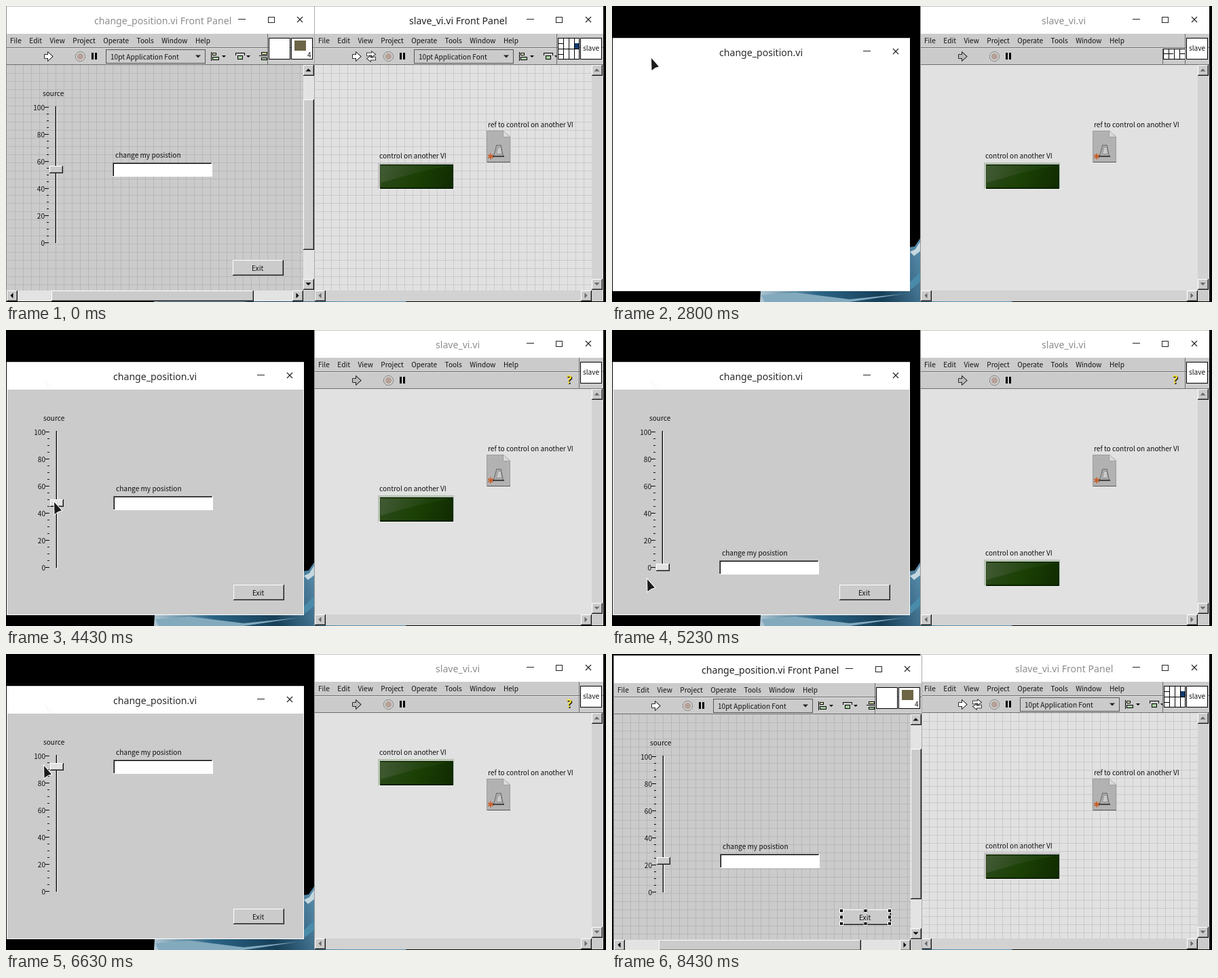
Write an HTML page with a canvas that moves like this. It is 884 by 437 pixels and loops after 9460 ms.

```html
<!DOCTYPE html>
<html lang="en">
<head>
<meta charset="utf-8">
<title>Front panels</title>
<style>
html, body { margin: 0; width: 100%; height: 100%; overflow: hidden; background: #000; }
canvas { display: block; }
</style>
</head>
<body>
<canvas id="stage" width="884" height="437"></canvas>
<script>
const g = document.getElementById('stage').getContext('2d');
const LOOP = 9460, STEP = 200;
const FACE = '#cbcbcb', LINE = '#6e6e6e', INK = '#101010';
const UI = '10.1px "Noto Sans CJK JP", "Noto Sans CJK SC", "Noto Sans", sans-serif';
const TITLE = '14.1px "Noto Sans", sans-serif';
const MENU = ['File', 'Edit', 'View', 'Project', 'Operate', 'Tools', 'Window', 'Help'];

// Phases in ms
const ENTER = 1410, FOCUS = 2200, RUN = 2610, READY = 3010,
  GRAB = 4230, RELEASE = 7230, PRESS = 8030, STOP = 8230, SELECT = 8430;

// Pointer moves: start, end, then where it arrives
const MOVES = [
  [1210, 2400, 57, 76],
  [2810, 3630, 88, 246],
  [3630, 4030, 72, 240],
  [GRAB, 5230, 51, 367],
  [5330, 6230, 55, 109],
  [6230, 6630, 55, 164],
  [6630, RELEASE, 52, 302],
  [RELEASE, 7830, 386, 389]
];

const clamp = (v, lo, hi) => Math.max(lo, Math.min(hi, v));

function ease(p) {
  p = clamp(p, 0, 1);
  return p * p * (3 - 2 * p);
}

function pointerAt(t) {
  let x = 94, y = 118;
  for (const [from, to, nx, ny] of MOVES) {
    const e = ease((t - from) / (to - from));
    x += (nx - x) * e;
    y += (ny - y) * e;
  }
  return [Math.round(x), Math.round(y)];
}

function rect(c, x, y, w, h) { g.fillStyle = c; g.fillRect(x, y, w, h); }

function frame(c, x, y, w, h, fill) {
  if (fill) rect(fill, x, y, w, h);
  g.strokeStyle = c; g.lineWidth = 1;
  g.strokeRect(x + .5, y + .5, w - 1, h - 1);
}

function text(s, x, y, c = INK, font = UI, align = 'left') {
  g.font = font; g.fillStyle = c; g.textAlign = align;
  g.fillText(s, x, y);
}

function path(pts, fill, stroke, width = 1) {
  g.beginPath();
  pts.forEach(([x, y]) => g.lineTo(x, y));
  g.closePath();
  if (stroke) { g.strokeStyle = stroke; g.lineWidth = width; g.stroke(); }
  if (fill) { g.fillStyle = fill; g.fill(); }
}

function shade(x0, y0, x1, y1, ...colours) {
  const fill = g.createLinearGradient(x0, y0, x1, y1);
  colours.forEach((c, i) => fill.addColorStop(i / (colours.length - 1), c));
  return fill;
}

function raised(x, y, w, h, face = FACE) {
  rect('#111', x, y, w, h);
  rect('#fff', x, y, w - 1, h - 1);
  rect('#858585', x + 1, y + 1, w - 2, h - 2);
  rect(face, x + 1, y + 1, w - 3, h - 3);
}

function at(x, y, fn) { g.save(); g.translate(x, y); fn(); g.restore(); }

function windowButtons(y, min, max, close) {
  rect('#222', min, y - 1, 11, 1);
  if (max) frame('#222', max, y - 4, 10, 9);
  g.strokeStyle = '#222'; g.lineWidth = 1.1;
  g.beginPath();
  g.moveTo(close - 4, y - 4); g.lineTo(close + 4, y + 4);
  g.moveTo(close + 4, y - 4); g.lineTo(close - 4, y + 4);
  g.stroke();
}

function triangle(x, y, turn, c, r = 4) {
  at(x, y, () => {
    g.rotate(turn * Math.PI / 2);
    path([[-r, r / 2], [r, r / 2], [0, -r / 2]], c);
  });
}

function scrollbars(right, live) {
  const c = live ? '#000' : '#666', track = live ? '#e3e3e3' : '#d2d2d2', low = 420;
  const arrow = (x, y, turn) => {
    raised(x, y, 16, 16);
    triangle(x + 7.5, y + 7.5, turn, c);
  };
  rect(track, right, 87, 16, low - 87);
  rect(track, 1, low, right - 1, 16);
  rect(FACE, right, low, 16, 16);
  arrow(right, 87, 0);
  arrow(right, low - 17, 2);
  arrow(1, low, 3);
  arrow(right - 16, low, 1);
  if (live) {
    raised(right, 138, 16, 222);
    raised(67, low, 298, 16);
  }
}

function alignIcon(x) {
  rect('#000', x, 68, 1, 13);
  frame('#000', x + 2, 69, 6, 4, '#e6e6b4');
  frame('#000', x + 2, 75, 10, 5, '#a9cfa4');
  triangle(x + 19, 74.5, 2, '#000', 3);
}

function spreadIcon(x) {
  rect('#000', x, 69, 14, 1);
  rect('#000', x, 69, 1, 4);
  rect('#000', x + 13, 69, 1, 4);
  frame('#000', x + 3, 73, 8, 6, '#a9cfa4');
  triangle(x + 19, 74.5, 2, '#000', 3);
}

function repeatIcon() {
  for (const turn of [0, Math.PI]) at(84, 74.5, () => {
    g.rotate(turn);
    path([[-6, -1], [-6, -5], [1, -5], [1, -7], [6, -3], [1, 0], [1, -2], [-3, -2], [-3, -1]], '#fff', '#000', 1.4);
  });
}

function toolbar(width, running, repeat) {
  rect(FACE, 0, 41, width, 46);
  let x = 6;
  for (const item of MENU) {
    text(item, x, 55);
    x += g.measureText(item).width + 11.5;
  }
  rect(LINE, 0, 61, width, 1);
  rect('#e4e4e4', 0, 62, width, 1);
  rect(LINE, 0, 86, width, 1);
  path([[57, 72], [62, 72], [62, 68.5], [68.5, 74.5], [62, 80.5], [62, 77], [57, 77]],
    running ? '#bbb' : '#fff', '#000', 1.6);
  g.beginPath(); g.arc(109.5, 74.5, 7, 0, 7);
  g.fillStyle = '#ddd'; g.fill();
  g.strokeStyle = '#777'; g.lineWidth = 1; g.stroke();
  g.beginPath(); g.arc(109.5, 74.5, 5, 0, 7);
  g.fillStyle = '#b5a198'; g.fill();
  rect('#000', 126, 69, 3, 10);
  rect('#000', 131, 69, 3, 10);
  if (running) return;
  if (repeat) repeatIcon();
  frame('#555', 147, 64, 147, 21);
  text('10pt Application Font', 154, 79);
  triangle(283, 74.5, 2, '#222', 4);
  alignIcon(302);
  spreadIcon(338);
}

function grid(right, c) {
  for (let x = 13; x < right; x += 12) rect(c, x, 87, 1, 333);
  for (let y = 99; y < 420; y += 12) rect(c, 1, y, right - 1, 1);
}

function iconBox(x) { frame('#000', x, 47, 32, 32, '#fff'); }

function connector(x) {
  iconBox(x);
  for (const d of [8, 16, 24]) rect('#000', x + d, 47, 1, 32);
  rect('#000', x, 63, 32, 1);
  rect('#000', x, 55, 8, 1);
  rect('#000', x, 71, 8, 1);
  rect('#123b70', x + 25, 55, 6, 8);
}

function controls(h, { active = false, pressed = false, selected = false }) {
  text('source', 54, 133);
  for (let i = 0; i <= 20; i++) {
    const y = 149 + i * 10, major = i % 4 === 0;
    rect('#000', major ? 57 : 60, y, major ? 6 : 3, 1);
    if (major) text(100 - i * 5, 57, y + 5, INK, UI, 'right');
  }
  rect('#888', 72, 148, 1, 202);
  rect('#000', 73, 148, 1, 202);
  rect('#fff', 74, 149, 1, 202);
  raised(64, h - 5, 20, 11, active ? '#e2e2e2' : FACE);

  text('change my posistion', 161, h - 17);
  rect('#fff', 157, h - 10, 147, 21);
  rect('#777', 157, h - 10, 146, 20);
  rect('#000', 158, h - 9, 144, 19);
  rect('#fff', 159, h - 8, 144, 18);

  if (pressed) frame('#666', 334, 375, 75, 23, FACE);
  else raised(334, 375, 75, 23);
  text('Exit', 362 + pressed, 391 + pressed);
  if (selected) {
    for (let i = 0; i < 9; i++) {
      if (i === 4) continue;
      frame('#fff', 333 + i % 3 * 35.5, 374 + Math.floor(i / 3) * 9.5, 6, 6, '#000');
    }
  }
}

function titleBar(s, x, w, focused) {
  rect('#fff', 0, 0, w, 41);
  rect('#c8c8c8', 0, 0, w, 1);
  text(s, x, 27, focused ? '#222' : '#8e8e8e', TITLE);
}

function editWindow(h, focused, opts) {
  titleBar('change_position.vi Front Panel', 130, 455, focused);
  windowButtons(20, 342, 386, 433);
  rect(FACE, 0, 41, 455, 395);
  toolbar(454, false, false);
  rect('#000', 373, 73, 12, 1);
  frame('#000', 376, 68, 9, 4, '#e6e6b4');
  frame('#000', 376, 76, 9, 4, '#a9cfa4');
  rect(LINE, 385, 41, 1, 45);
  iconBox(387);
  iconBox(420);
  rect('#6d6546', 425, 51, 17, 15);
  text('4', 444, 76);
  grid(438, '#b8b8b8');
  controls(h, opts);
  scrollbars(438, true);
  rect('#888', 0, 0, 1, 436);
  rect('#aaa', 454, 0, 1, 436);
}

function runWindow(h, blank, opts) {
  rect('#fff', 1, 47, 438, 374);
  rect('#d0d0d0', 1, 47, 438, 1);
  text('change_position.vi', 158, 74, '#2b2b2b', TITLE);
  windowButtons(67, 370, 0, 418);
  if (blank) return;
  path([[58, 75], [71, 88], [64, 88]], null, '#f3f3f3');
  rect(FACE, 2, 88, 436, 332);
  at(1, 1, () => controls(h, opts));
}

function led(h, running) {
  text('control on another VI', 96, h - 16);
  rect(running ? '#b9c4b6' : '#c4c4c4', 94, h - 10, 112, 40);
  rect('#f0f0f0', 95, h + 28, 111, 2);
  const x = 97, y = h - 7;
  rect(shade(x, y, x + 108, y + 36, '#2c4a1c', '#1b4004', '#102a02'), x, y, 108, 36);
  path([[x + 1, y + 2], [x + 100, y + 2], [x + 50, y + 13], [x + 1, y + 27]],
    shade(x, y, x + 75, y + 20, '#425a34', '#1c4008'));
  rect('#0b2000', x, y, 108, 1);
  rect('#0b2000', x, y + 34, 108, 2);
}

function refIcon() {
  text('ref to control on another VI', 256, 179);
  path([[254.5, 184.5], [279, 184.5], [288.5, 193], [288.5, 230.5], [254.5, 230.5]], '#b2b2b2', '#8a8a8a');
  path([[279, 184], [288, 193], [279, 193]], '#d8d8d8', '#888');
  rect('#555', 255, 230, 34, 1);
  path([[269, 206], [275, 206], [278, 221], [265, 221]], '#aaa', '#555', 1.5);
  path([[271, 209], [275, 209], [276, 218], [269, 218]], '#c8c8c8', '#777');
  rect('#444', 263, 221, 17, 2);
  g.strokeStyle = '#c95a20'; g.lineWidth = 1.5;
  g.beginPath();
  for (let i = 0; i < 3; i++) {
    const a = Math.PI * (i / 3 + .5), c = Math.cos(a) * 4.5, s = Math.sin(a) * 4.5;
    g.moveTo(260 - c, 222 - s); g.lineTo(260 + c, 222 + s);
  }
  g.stroke();
}

function slaveIcons(running, fresh) {
  if (!running) {
    rect(FACE, 357, 63, 69, 23);
    rect(LINE, 357, 41, 1, 45);
    connector(359);
  } else if (fresh) {
    rect(LINE, 357, 63, 1, 23);
    rect('#000', 358, 63, 32, 16);
    for (let i = 0; i < 4; i++) rect('#fff', 359 + i * 8, 64, 7, 14);
    rect('#000', 358, 70, 15, 1);
    rect('#000', 382, 70, 8, 1);
  } else {
    const font = 'bold 16px "Noto Sans", sans-serif';
    text('?', 373, 80, '#000', font);
    text('?', 372, 79, '#f2dc20', font);
  }
  if (running) rect(LINE, 390, 41, 1, 45);
  iconBox(392);
  text('slave', 408, 66, INK, UI, 'center');
}

function slaveWindow(h, focused, running, fresh) {
  if (running) titleBar('slave_vi.vi', 179, 426, focused);
  else titleBar('slave_vi.vi Front Panel', 140, 426, focused);
  windowButtons(20, 313, 356, 404);
  rect('#e1e1e1', 0, 41, 426, 395);
  toolbar(426, running, true);
  slaveIcons(running, fresh);
  if (!running) grid(409, '#cacaca');
  refIcon();
  led(h, running);
  scrollbars(409, false);
  rect('#999', 0, 0, 1, 436);
}

function wallpaper() {
  rect('#000', 0, 0, 884, 437);
  path([[218, 437], [219, 421], [410, 400], [438, 356], [446, 355], [454, 343], [590, 437]],
    shade(218, 437, 455, 345, '#b4c9d4', '#2b6586', '#173f58', '#5b91b0'));
  path([[439, 363], [447, 359], [454, 348], [454, 362], [445, 369]], '#c5d7df');
  path([[439, 408], [454, 393], [454, 407], [440, 419]], '#4b8baa');
  path([[220, 427], [270, 423], [350, 433], [430, 425], [350, 437], [225, 437]], '#83a9bd');
}

function pointer(x, y) {
  at(x, y, () => path([[1, 1], [12, 13.5], [7, 15], [1.5, 19]], '#1c1c1c', '#fff', 2));
}

function draw(t) {
  const running = t >= RUN && t < STOP, fresh = t < READY;
  const beat = Math.floor((t - 10) / STEP) * STEP + 30;
  const dragged = pointerAt(Math.min(beat, RELEASE))[1] + 1;
  const h = beat < GRAB ? 241 : clamp(dragged, 149, 349);

  wallpaper();
  at(454, 0, () => slaveWindow(h, t < FOCUS, running, fresh));
  if (running) runWindow(h, fresh, { active: beat > GRAB, pressed: t >= PRESS });
  else if (t < RUN) editWindow(h, t >= FOCUS, {});
  else at(2, 2, () => editWindow(h, true, { selected: t >= SELECT }));
  if (t >= ENTER && t < STOP) pointer(...pointerAt(beat));
}

function tick(now) {
  draw(now % LOOP);
  requestAnimationFrame(tick);
}
requestAnimationFrame(tick);
</script>
</body>
</html>
```
